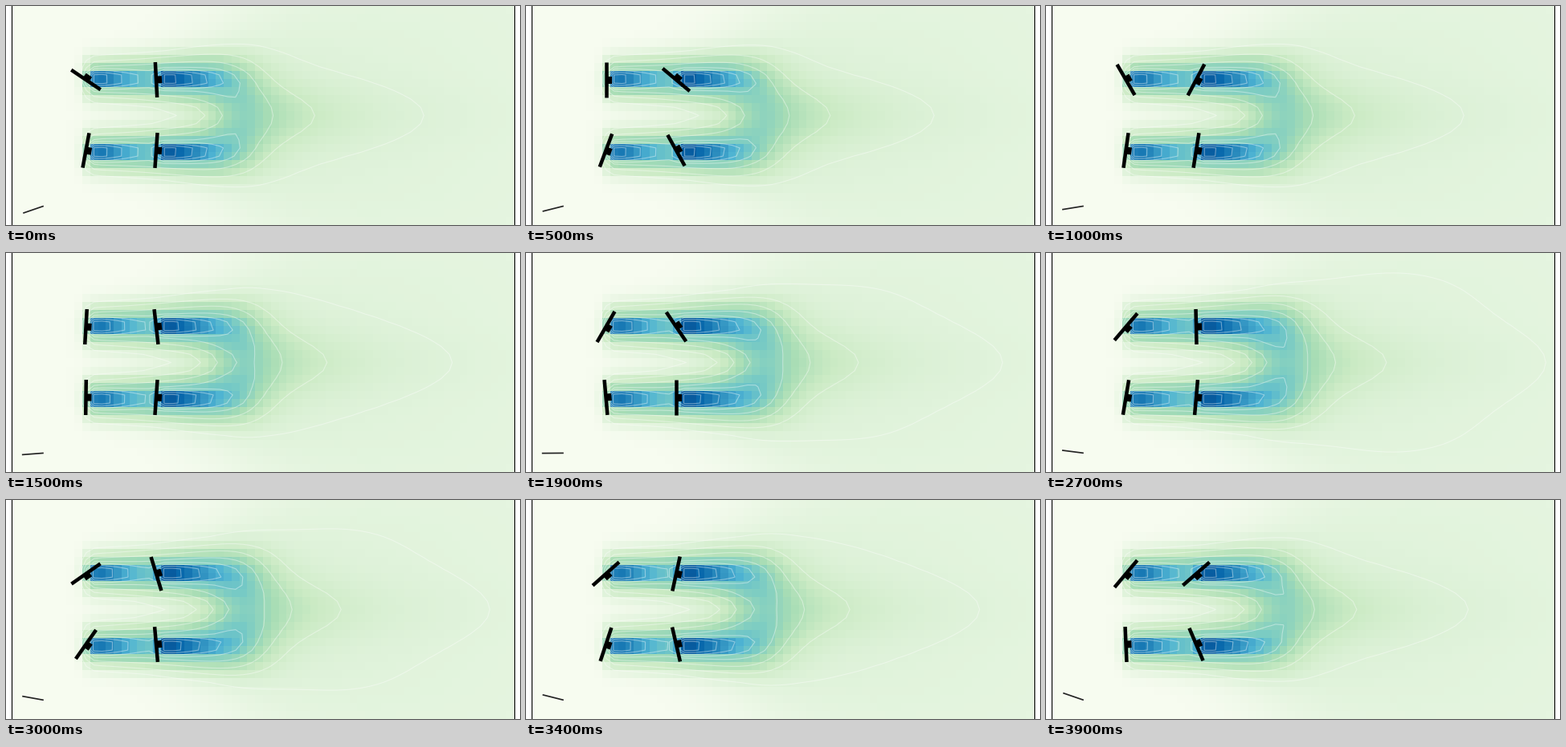
Write a matplotlib script that moves like this. It is 640 by 273 pixels and loops after 4000 ms.

```python
import numpy as np
import matplotlib.pyplot as plt
from matplotlib.animation import FuncAnimation
from matplotlib.patches import Polygon

W, H, DPI = 640, 273, 100
FRAMES, INTERVAL = 40, 100
PT = 72 / DPI
LEFT, RIGHT = 7, 633
COLS, ROWS = 64, 27
MID = H / 2
GAP = 45.5  # distance of each wake row from the middle
FRONT, BACK = 99.5, 187

# Turbine poses: rotor tilt in degrees at a few moments
KEYS = [0, 5, 10, 19, 24, 30, 39]
TURBINES = [
    ((FRONT, 92), [-56, 0, -30, 30, 26, 55, 40]),
    ((BACK, 92), [-3, -50, 28, -34, 14.5, -17, 49]),
    ((FRONT, 180), [10.5, 20.5, 8, -5, -16, 35, -2.5]),
    ((BACK, 180), [4, -29, 9, 0, 15, -5, -23]),
]
LEVELS = 0.14 + 0.107 * np.arange(8)

xs = LEFT + (RIGHT - LEFT) / COLS * (np.arange(COLS) + 0.5)
ys = H / ROWS * (np.arange(ROWS) + 0.5)
X, Y = np.meshgrid(xs, ys)


def step(x, center, width):
    return 1 / (1 + np.exp((center - x) / width))


def hump(d, width, power=2):
    return np.exp(-(np.abs(d) / width) ** power)


def fade(x, start, length):
    return np.exp(-np.maximum(x - start, 0) / length)


def core(x0, amp, length):
    """Strong short wake that starts just behind a rotor."""
    behind = np.maximum(X - x0 - 5, 0)
    return amp * step(X, x0 + 3, 3) * hump(behind, length)


def wave(i):
    return np.cos(2 * np.pi * (i - 5) / FRAMES)


def field(i):
    # Wide halo, merged flow on the centre line, then the two rows
    halo = 0.15 * step(X, 245, 45) * fade(X, 300, 900)
    total = halo * hump(Y - MID, 60 + 0.5 * np.maximum(X - 100, 0), 3)
    total += 0.3 * step(X, 266, 16) * fade(X, 300, 90) * hump(Y - MID, 40)

    skirt = 0.47 * step(X, 98, 3.5) * step(-X, -300 + 10 * wave(i), 22)
    cores = core(FRONT, 0.40, 50) + core(BACK, 0.45, 60)
    for y in (MID - GAP, MID + GAP):
        total += skirt * hump(Y - y, 26 + 0.05 * (X - 100), 2.4)
        total += cores * hump(Y - y, 11, 4)
    return np.clip(total, 0, 1)


fig = plt.figure(figsize=(W / DPI, H / DPI), dpi=DPI, facecolor="white")
ax = fig.add_axes([0, 0, 1, 1])
ax.axis("off")

image = ax.imshow(field(0), extent=(LEFT, RIGHT, H, 0), cmap="GnBu",
                  vmin=0, vmax=1, interpolation="nearest", aspect="auto")
for x in (LEFT, RIGHT):
    ax.plot([x, x], [-5, H + 5], color="black", lw=0.8, zorder=5)

blades, nacelles = [], []
for _ in TURBINES:
    blades += ax.plot([], [], color="black", lw=4.5 * PT,
                      solid_capstyle="butt", zorder=4)
    nacelles.append(ax.add_patch(
        Polygon(np.zeros((4, 2)), color="black", lw=0, zorder=4)))
vane, = ax.plot([], [], color="#222222", lw=1.7 * PT,
                solid_capstyle="butt", zorder=4)
ax.set_xlim(0, W)
ax.set_ylim(H, 0)

rings = []


def draw(i):
    z = field(i)
    image.set_data(z)
    while rings:
        rings.pop().remove()
    # Weak levels shift most over the loop
    shift = 0.15 * wave(i) - 0.08
    rings.append(ax.contour(X, Y, z, levels=LEVELS * (1 + shift * (1 - LEVELS)),
                            colors="white", linewidths=0.8, alpha=0.4,
                            zorder=3))

    for (hub, tilts), blade, nacelle in zip(TURBINES, blades, nacelles):
        a = np.radians(np.interp(i, KEYS, tilts))
        along = np.array([np.sin(a), -np.cos(a)])
        normal = np.array([np.cos(a), np.sin(a)])
        ends = np.array([hub - 22 * along, hub + 22 * along])
        blade.set_data(ends[:, 0], ends[:, 1])
        nacelle.set_xy([hub + n * normal + s * along for n, s in
                        ((0, -4.5), (7, -4.5), (7, 4.5), (0, 4.5))])

    a = np.radians(19 - 0.975 * i)
    vane.set_data([46.8 - 27 * np.cos(a), 46.8],
                  [249.4 + 27 * np.sin(a), 249.4])
    return [image, vane, *blades, *nacelles]


anim = FuncAnimation(fig, draw, frames=FRAMES, interval=INTERVAL,
                     repeat=True, repeat_delay=0, blit=False)
plt.show()
```
